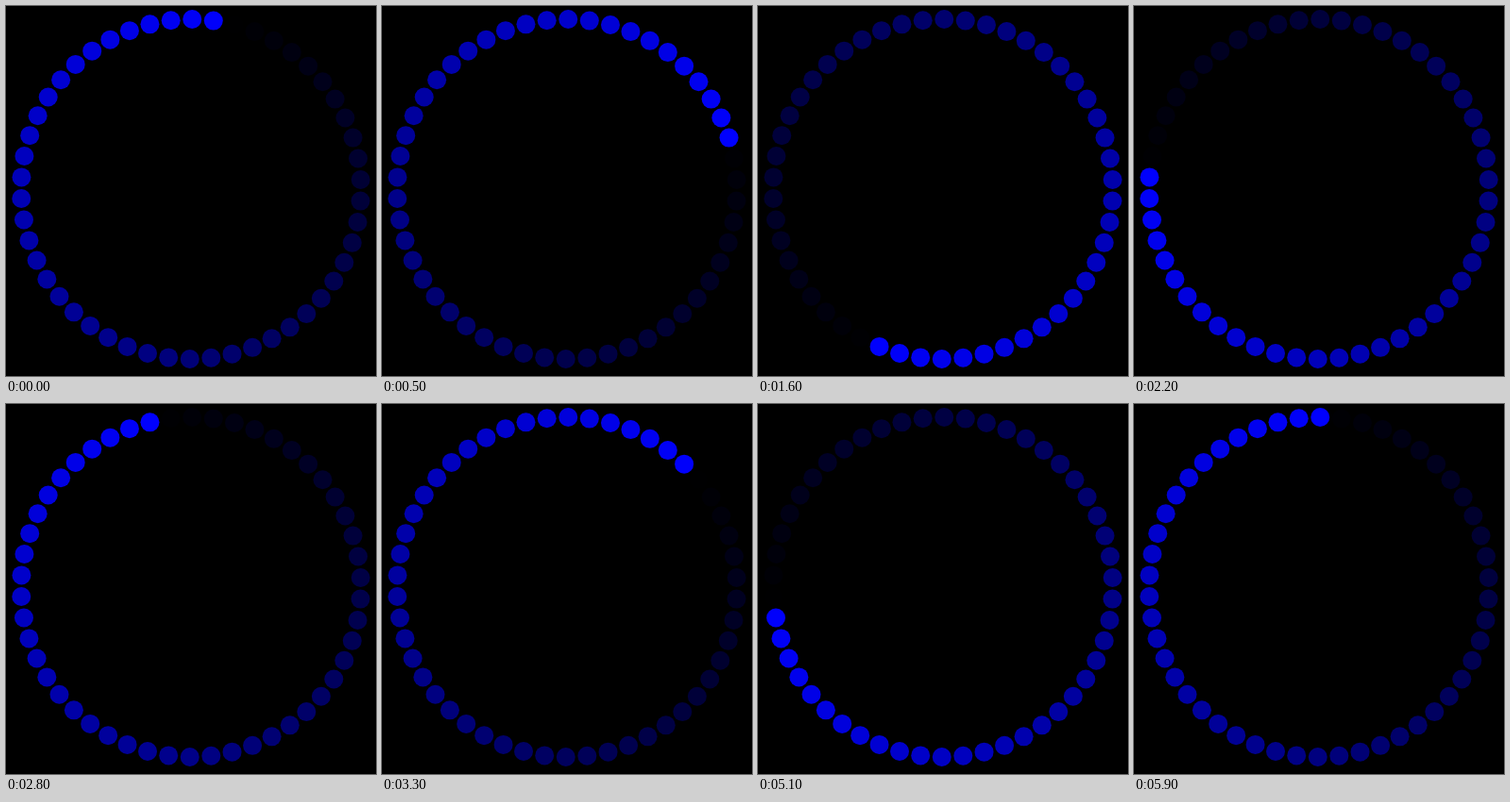
An HTML page with a canvas that plays this animation: 392 by 392 pixels, repeating every 6 s.

```html
<!DOCTYPE html>
<html>
<head>
<meta charset="utf-8">
<title>Circle spinner</title>
<style>
html, body { margin: 0; height: 100%; overflow: hidden; background: #000; }
canvas { display: block; }
</style>
</head>
<body>
<canvas id="stage" width="392" height="392"></canvas>
<script>
const ctx = document.getElementById('stage').getContext('2d');
const DOTS = 50, TURN = 3000, STEP = 100;
const CX = 196, CY = 194, RING = 180, DOT = 10;
const START = -89.6 * Math.PI / 180; // first dot sits just past the top
const LEAD = 1.8;                    // dots already lit at time zero

function draw(now) {
  const time = Math.floor(now / STEP) * STEP % TURN;
  const head = LEAD + time / TURN * DOTS;

  ctx.fillStyle = '#000';
  ctx.fillRect(0, 0, 392, 392);

  for (let i = 0; i < DOTS; i++) {
    const age = (head - i + DOTS) % DOTS;
    const angle = START + i / DOTS * 2 * Math.PI;
    ctx.fillStyle = `rgba(0, 0, 255, ${1 - age / DOTS})`;
    ctx.beginPath();
    ctx.arc(CX + RING * Math.cos(angle), CY + RING * Math.sin(angle), DOT, 0, 2 * Math.PI);
    ctx.fill();
  }
}

const begin = performance.now();
function tick() {
  draw(performance.now() - begin);
  requestAnimationFrame(tick);
}
tick();
</script>
</body>
</html>
```
